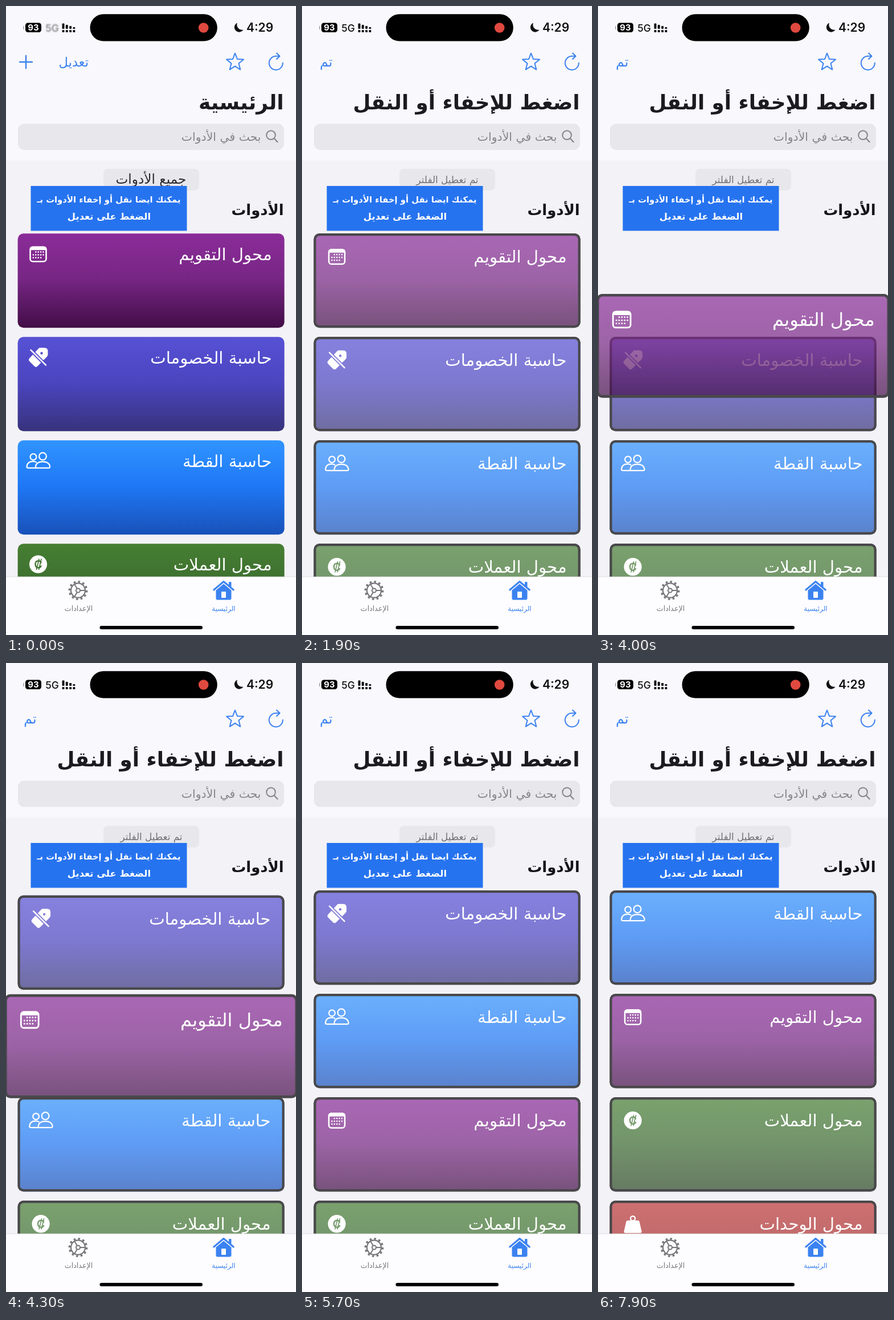
Animation of 509 by 1101 pixels, one loop 8000 ms. Source, as an HTML page:

```html
<!DOCTYPE html>
<html lang="ar">
<head>
<meta charset="utf-8">
<title>الأدوات</title>
<style>
  html, body { margin: 0; width: 100%; height: 100%; overflow: hidden; background: #f3f2f6; }
  svg { display: block; width: 100%; height: 100%; }
  text { font-family: "DejaVu Sans", sans-serif; direction: rtl; }
  .latin { font-family: Inter, sans-serif; direction: ltr; }
  .line { fill: none; stroke-linecap: round; stroke-linejoin: round; }
</style>
</head>
<body>
<svg id="stage" viewBox="0 0 509 1101" xmlns="http://www.w3.org/2000/svg"></svg>
<script>
const LOOP = 8000, PITCH = 181, TOP = 398, LIFT = 1.1;
const BLUE = '#3b82f0', GRAY = '#85848a';

const CARDS = [
  { id: 'calendar', label: 'محول التقويم', colors: ['#8b2c99', '#772684', '#420d47'] },
  { id: 'discount', label: 'حاسبة الخصومات', colors: ['#5751d5', '#4b45c0', '#37337c'] },
  { id: 'split', label: 'حاسبة القطة', colors: ['#3094ff', '#1f78f6', '#1951b9'] },
  { id: 'currency', label: 'محول العملات', colors: ['#467f33', '#3c6c2f', '#2a4622'] },
  { id: 'units', label: 'محول الوحدات', colors: ['#bf3838', '#a83030', '#6a1e1e'] }
];

// Right-aligned by default, since "start" is the right edge in rtl text.
const text = (x, y, s, size, fill, extra = '') =>
  `<text x="${x}" y="${y}" font-size="${size}" fill="${fill}" ${extra}>${s}</text>`;
const box = (x, y, w, h, r, fill, extra = '') =>
  `<rect x="${x}" y="${y}" width="${w}" height="${h}" rx="${r}" fill="${fill}" ${extra}/>`;
const line = (d, color, width) =>
  `<path class="line" d="${d}" stroke="${color}" stroke-width="${width}"/>`;
const dot = (x, y, r, fill) => `<circle cx="${x}" cy="${y}" r="${r}" fill="${fill}"/>`;
const ring = (x, y, r, color, width) =>
  `<circle class="line" cx="${x}" cy="${y}" r="${r}" stroke="${color}" stroke-width="${width}"/>`;
const MID = 'text-anchor="middle"', BOLD = 'font-weight="700"';

function calendarDots() {
  let out = '';
  for (let row = 0; row < 3; row++)
    for (let col = 0; col < 5; col++)
      if (!(row === 0 && col === 0) && !(row === 2 && col === 4))
        out += dot(-8.6 + col * 4.4, -3.6 + row * 5, 1.3, '#fff');
  return out;
}

// Icons are centred on their own origin.
const ICONS = {
  calendar: box(-14, -12.5, 28, 25.5, 4.5, 'none', 'stroke="#fff" stroke-width="2.6"') +
    '<path d="M-14-7V-9q0-4 4-4H10q4 0 4 4v2z" fill="#fff"/>' + calendarDots(),
  discount: '<g mask="url(#tagCut)"><path d="M3-17H11Q17-17 17-11V-5Q17-3 15-1L-1 15' +
    'Q-4 18-7 15L-15 7Q-18 4-15 1L0-15Q1-17 3-17Z" fill="#fff"/></g>' +
    line('M-13-13L13.5 13.5', '#fff', 2.5),
  split: line('M-2.5 12.5H-17Q-20 12.5-20 10Q-19 1-9 1Q-6 1-3.5 2.4', '#fff', 2.2) +
    ring(-8.5, -7, 5.4, '#fff', 2.2) + ring(8, -8, 6.4, '#fff', 2.2) +
    line('M-2 12.5H18Q21 12.5 20.5 9.5Q19 1.5 8 1.5T-4.5 9.5Q-5 12.5-2 12.5Z', '#fff', 2.2),
  currency: '<circle r="15.6" fill="#fff" mask="url(#coinCut)"/>',
  units: ring(0, -9.5, 4, '#fff', 2.4) +
    '<path d="M-9-6H9Q11-6 11.6-4L15.5 13Q16 16 13 16H-13Q-16 16-15.5 13L-11.6-4Q-11-6-9-6Z" fill="#fff"/>'
};

const gradient = c => `<linearGradient id="g-${c.id}" x2="0" y2="1">` +
  c.colors.map((col, i) => `<stop offset="${[0, .48, 1][i]}" stop-color="${col}"/>`).join('') +
  '</linearGradient>';

const card = c => `<g id="${c.id}">
  ${box(0, 0, 468, 165, 10, `url(#g-${c.id})`, 'class="fill"')}
  ${box(2, 2, 464, 161, 8, 'none', 'class="edge" stroke="#49484b" stroke-width="4.2"')}
  <g class="content"><g class="label">${text(446, 46.5, c.label, 29.2, '#fff')}</g>
  <g class="icon">${ICONS[c.id]}</g></g></g>`;

function starPath(cx, cy, r) {
  let d = '';
  for (let i = 0; i < 10; i++) {
    const a = i * Math.PI / 5, q = i % 2 ? r * .43 : r;
    d += (i ? 'L' : 'M') + (cx + q * Math.sin(a)).toFixed(1) + ' ' + (cy - q * Math.cos(a)).toFixed(1);
  }
  return d + 'Z';
}

function signal() {
  let out = '';
  [9.5, 7, 5, 3].forEach((h, i) => {
    const x = 98.5 + i * 6.3;
    out += box(x, 40 - h, 4, h, 1, '#111') + box(x, 42, 4, 4, 1, '#111');
  });
  return out;
}

const defs = `<defs>${CARDS.map(gradient).join('')}
  <mask id="tagCut"><rect x="-25" y="-25" width="50" height="50" fill="#fff"/>
    ${line('M-18-18L20 20', '#000', 6)}${dot(6, -7.5, 2.2, '#000')}</mask>
  <mask id="coinCut"><rect x="-20" y="-20" width="40" height="40" fill="#fff"/>
    ${line('M5-3.2Q3.5-6 .5-6Q-5-6-5 0T.5 6Q3.5 6 5 3.2', '#000', 2.4)}
    ${line('M-3 9L1.5-9M1 9L5.5-9', '#000', 1.7)}</mask></defs>`;

const header = box(0, 0, 509, 270.5, 0, '#f9f8fc') +
  box(34, 29.5, 28, 16.5, 4.5, '#000') + box(30, 35, 2, 6, 1, '#b5b4b8') +
  text(48, 43.2, '93', 15, '#fff', `class="latin" ${BOLD} ${MID}`) +
  `<g id="network">${text(81, 44.5, '5G', 17.5, '#111', `class="latin" font-weight="500" ${MID}`)}</g>` +
  signal() + box(147.5, 14.3, 223.3, 47.3, 23.6, '#000') + dot(346.7, 38, 8.8, '#e0493f') +
  '<path id="moon" d="M406 29.5A8.4 8.4 0 1 0 416.5 41.5A9 9 0 0 1 406 29.5Z" fill="#111"/>' +
  text(445.5, 45.3, '4:29', 21, '#111', `class="latin" font-weight="600" ${MID}`) +
  line(starPath(402, 98.5, 15.8), BLUE, 2) +
  line('M485.8 99.5A12 12 0 1 1 474 87.8H480M475 82.5L480.5 87.8L475 93', BLUE, 2) +
  `<g class="browse">${line('M35 87V109M24 98H46', BLUE, 2.4)}
    <g id="editButton">${text(145, 106, 'تعديل', 22.6, BLUE)}</g>
    ${text(487.5, 180.5, 'الرئيسية', 36, '#1c1b1f', BOLD)}</g>` +
  `<g class="editing">${text(53.5, 106, 'تم', 23.5, BLUE)}
    ${text(487.5, 180.5, 'اضغط للإخفاء أو النقل', 35.7, '#1c1b1f', BOLD)}</g>` +
  box(21, 206, 467, 46, 11, '#e8e7eb') + ring(465, 226, 7.8, GRAY, 2) +
  line('M470.8 232L476.5 238', GRAY, 2.2) + text(447.5, 236, 'بحث في الأدوات', 20.4, GRAY);

const body = box(171, 285, 168, 38, 8, '#e8e7eb') +
  `<g class="browse">${text(254.5, 311, 'جميع الأدوات', 23.2, '#2b2a2e', MID)}</g>` +
  `<g class="editing">${text(255, 309.5, 'تم تعطيل الفلتر', 16.8, '#717075', MID)}</g>` +
  text(487.5, 366, 'الأدوات', 25.8, '#161519', BOLD) +
  box(43.5, 315, 274, 78.5, 0, '#2673ef') +
  text(180.5, 344, 'يمكنك ايضا نقل أو إخفاء الأدوات بـ', 14.8, '#fff', `${BOLD} ${MID}`) +
  text(181, 374, 'الضغط على تعديل', 16.4, '#fff', `${BOLD} ${MID}`);

const tabs = box(0, 999, 509, 102, 0, '#fdfcfe') + box(0, 998.7, 509, .8, 0, '#d8d7da') +
  ring(126.5, 1023, 12.6, '#77767a', 2.2) +
  '<circle cx="126.5" cy="1023" r="15.2" fill="none" stroke="#77767a" stroke-width="3.4" pathLength="48" stroke-dasharray="1.8 2.2"/>' +
  ring(126.5, 1023, 3.6, '#77767a', 2) +
  line('M130 1023H139M124.7 1019.8L120.4 1012.2M124.7 1026.2L120.4 1033.8', '#77767a', 2) +
  text(127.5, 1058.5, 'الإعدادات', 12.6, '#77767a', MID) +
  line('M364.8 1022L382 1007.5L399.2 1022', BLUE, 3) + box(391, 1008, 4.5, 9, 1, BLUE) +
  `<path d="M382 1011.5L395.5 1022.8V1036.5Q395.5 1039.5 392.5 1039.5H371.5Q368.5 1039.5 368.5 1036.5V1022.8Z" fill="${BLUE}"/>` +
  box(378, 1025, 8, 11, 1, '#fdfcfe') +
  text(382, 1058.5, 'الرئيسية', 12, BLUE, MID) + box(164.5, 1085, 180.5, 6, 3, '#000');

const stage = document.getElementById('stage');
// The calendar card is painted last because it is dragged over the others.
stage.innerHTML = defs + header + body + [...CARDS].reverse().map(card).join('') + tabs;

const $ = id => document.getElementById(id);
const parts = CARDS.map(c => {
  const el = $(c.id), find = s => el.querySelector('.' + s);
  return { el, fill: find('fill'), edge: find('edge'), content: find('content'),
    label: find('label'), icon: find('icon') };
});
const browse = stage.querySelectorAll('.browse'), editing = stage.querySelectorAll('.editing');
const show = (el, on) => el.setAttribute('display', on ? 'inline' : 'none');

const linear = p => p;
const inOut = p => p < .5 ? 4 * p ** 3 : 1 - 4 * (1 - p) ** 3;
function track(t, keys, ease = linear) {
  if (t <= keys[0][0]) return keys[0][1];
  for (let i = 1; i < keys.length; i++) {
    const [t0, a] = keys[i - 1], [t1, b] = keys[i];
    if (t < t1) return a + (b - a) * ease((t - t0) / (t1 - t0));
  }
  return keys[keys.length - 1][1];
}

const EDIT = 1200, HIDE = 7400;
const DRAG = [[3550, 0], [4300, 189.8], [5100, 342.3], [5350, 362]];
const SCALE = [[3350, 1], [3550, LIFT], [5380, LIFT], [5640, 1]];
const SWAPS = { 1: [[4031, 1], [4381, 0]], 2: [[4854, 2], [5204, 1]] };

function render(t) {
  const edit = t >= EDIT, hidden = t >= HIDE;
  browse.forEach(el => show(el, !edit));
  editing.forEach(el => show(el, edit));
  $('editButton').setAttribute('opacity', t >= 940 ? .2 : 1);

  const blur = track(t, [[0, 1], [350, 0]]);
  $('network').style.filter = blur > 0 ? `blur(${1.3 * blur}px)` : 'none';
  $('network').setAttribute('opacity', 1 - .45 * blur);
  $('moon').style.filter = blur > 0 ? `blur(${.8 * blur}px)` : 'none';

  parts.forEach((p, i) => {
    let y = (SWAPS[i] ? track(t, SWAPS[i], inOut) : i) * PITCH;
    if (i === 0) y = track(t, DRAG);
    if (hidden) y -= PITCH;
    const s = i === 0 ? track(t, SCALE, inOut) : 1;
    p.el.setAttribute('transform',
      `translate(254.6 ${TOP + 82.7 + y}) scale(${s}) translate(-234 -82.5)`);
    show(p.el, !(i === 1 && hidden));
    show(p.edge, edit);
    p.fill.setAttribute('opacity', edit ? .7 : 1);
    p.label.setAttribute('transform', edit ? 'translate(-2 4.5)' : '');
    p.icon.setAttribute('transform', edit ? 'translate(40.5 40.5)' : 'translate(35.9 36)');
    const pressed = i === 0 && t >= 2950 && t < 3350 || i === 1 && t >= 7150;
    p.content.setAttribute('opacity', pressed ? .2 : 1);
  });
}

function tick() {
  render(performance.now() % LOOP);
  requestAnimationFrame(tick);
}
tick();
</script>
</body>
</html>
```
